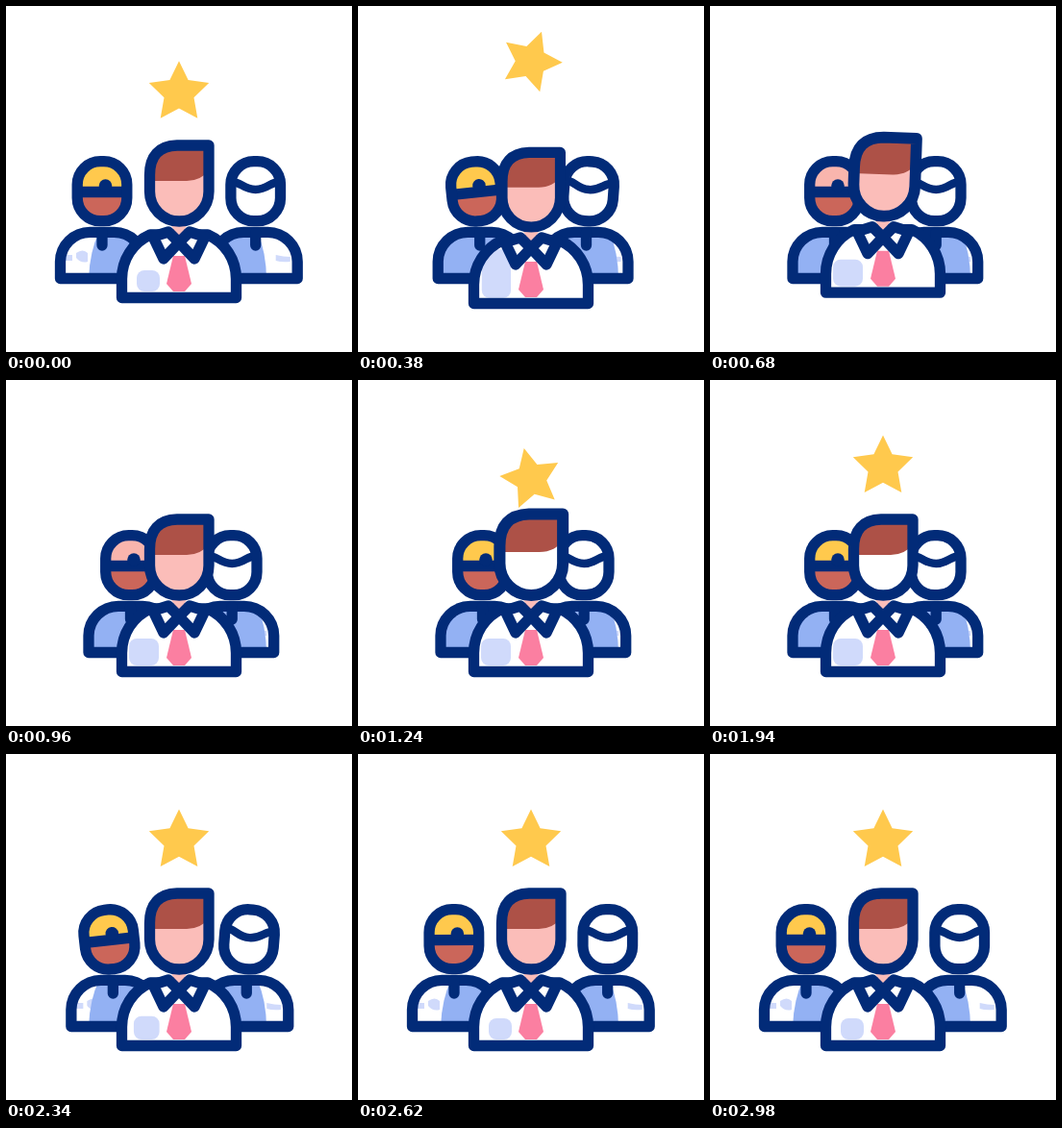
An HTML page that plays this animation: 360 px wide and 360 px high, repeating every 3 s.

```html
<!DOCTYPE html>
<html lang="en">
<head>
<meta charset="utf-8">
<title>Team leader</title>
<style>
html, body { margin: 0; width: 100%; height: 100%; overflow: hidden; background: #fff; }
svg { display: block; width: 100vw; height: 100vh; }
.line { fill: none; stroke: #022b78; stroke-width: 11.3; stroke-linejoin: round; stroke-linecap: round; }
.white { fill: #fff; }
.pale { fill: #d0dafb; }
.shade { fill: #93b1f3; }
</style>
</head>
<body>
<svg viewBox="0 0 360 360">
  <defs>
    <path id="sideBody" d="M-43.5 283.5V266A31 31 0 0 1 -12.5 235.3H12.5A31 31 0 0 1 43.5 266V283.5Z"/>
    <rect id="sideHead" x="-25.8" y="161.7" width="51.6" height="62" rx="24"/>
    <path id="shadow" d="M86 285Q87 250 101 228H258Q271 252 271 285Z"/>
    <path id="mainBody" d="M120.5 303.5V284C120.5 264 132 246 150 238H210C228 246 239.5 264 239.5 284V303.5Z"/>
    <path id="mainHead" d="M211 145H178Q149.5 146 149.5 176V193A30.75 31 0 0 0 211 193Z"/>
    <clipPath id="sideClip"><use href="#sideBody"/></clipPath>
    <clipPath id="bodyClip"><use href="#mainBody"/></clipPath>
    <clipPath id="headClip"><use href="#mainHead"/></clipPath>
  </defs>

  <path id="star" fill="#ffc94d"/>

  <g id="left">
    <use href="#sideBody" class="white"/>
    <g clip-path="url(#sideClip)">
      <path class="pale" d="M-27 257q7-5 12 0v9q-7 2-12-4zM-38 259h7v6h-7z"/>
      <use id="leftShade" href="#shadow" class="shade"/>
    </g>
    <use href="#sideBody" class="line"/>
    <path class="line" d="M0 236V249"/>
    <g id="leftHead">
      <use href="#sideHead" fill="#cb665a"/>
      <path id="cap" d="M-25.5 192V187A25.5 25.5 0 0 1 25.5 187V192Z"/>
      <path class="line" d="M-25 193.5H25"/>
      <circle cx="3.5" cy="187" r="6.8" fill="#022b78"/>
      <use href="#sideHead" class="line"/>
    </g>
  </g>

  <g id="right">
    <use href="#sideBody" class="white"/>
    <g clip-path="url(#sideClip)">
      <path class="pale" d="M21 259q8 2 15 2v5q-9 1-15-1z"/>
      <use id="rightShade" href="#shadow" class="shade"/>
    </g>
    <use href="#sideBody" class="line"/>
    <path class="line" d="M0 236V249"/>
    <g id="rightHead">
      <use href="#sideHead" class="white"/>
      <path class="line" style="stroke-width:8.5" d="M-26 183C-16 182-13 191 0 191S16 182 26 183"/>
      <use href="#sideHead" class="line"/>
    </g>
  </g>

  <g id="leader">
    <use href="#mainBody" class="white"/>
    <rect id="patch" class="pale" rx="8" clip-path="url(#bodyClip)"/>
    <path fill="#fb7fa1" d="M174 260H186L193 289 186 297H174L167 289Z"/>
    <use href="#mainBody" class="line"/>
    <path fill="#fbbdb9" d="M171 227H189L180 242Z"/>
    <path class="line" style="fill:#fff" d="M153 240L164 263 180 246 169 235ZM207 240L196 263 180 246 191 235Z"/>
    <g id="head">
      <use id="face" href="#mainHead"/>
      <path clip-path="url(#headClip)" fill="#ad5147" d="M145 140H216V160Q209 182 188 182H145Z"/>
      <use href="#mainHead" class="line"/>
    </g>
  </g>
</svg>
<script>
const LOOP = 3000;
const KICK = 580, CATCH = 1070;   // the star leaves the head, and comes back to it
const REST_Y = 90.4, TOUCH_Y = 107;

const set = (id, name, value) => document.getElementById(id).setAttribute(name, value);
const part = (t, a, b) => Math.min(1, Math.max(0, (t - a) / (b - a)));
const ease = (t, a, b) => { const u = part(t, a, b); return u * u * (3 - 2 * u); };
const pulse = (t, a, b) => Math.sin(Math.PI * part(t, a, b)) ** 2;

function starPath() {
  const corners = Array.from({ length: 10 }, (_, i) => {
    const r = i % 2 ? 16.3 : 32.8, a = i * Math.PI / 5;
    return `${(r * Math.sin(a)).toFixed(2)} ${(-r * Math.cos(a)).toFixed(2)}`;
  });
  return `M${corners.join("L")}Z`;
}

// A small toss, a high flight after the kick, then a soft return to rest.
function starHeight(t) {
  if (t < KICK) return 50 + (REST_Y - 50) * ((t - 265) / 265) ** 2;
  if (t < CATCH) {
    const u = part(t, KICK, CATCH);
    return TOUCH_Y - 900 * u * (1 - u);
  }
  return TOUCH_Y + (REST_Y - TOUCH_Y) * ease(t, CATCH, 1600);
}

// One fifth of a turn in all, so the star ends as it began.
const starTurn = t => 27 * ease(t, 0, KICK) + 28 * part(t, KICK, CATCH) + 17 * ease(t, CATCH, 1600);

function placeSide(side, x, tilt) {
  set(side, "transform", `translate(${x} 0)`);
  set(side + "Shade", "transform", `translate(${-x} 0)`);
  set(side + "Head", "transform", `rotate(${tilt} 0 228)`);
}

function draw(t) {
  const gather = ease(t, 0, 470) - ease(t, 1960, 2620);
  const tilt = -6.5 * (pulse(t, 0, 640) + pulse(t, 1960, 2660));
  placeSide("left", 100 + 29.5 * gather, tilt);
  placeSide("right", 259.7 - 24.5 * gather, -tilt * .7);

  const y = starHeight(t);
  set("star", "transform", `translate(180 ${y}) rotate(${starTurn(t)})`);
  set("cap", "fill", y < -32 ? "#f9b5ad" : "#ffc94d");

  const squat = pulse(t, 200, 660), hop = pulse(t, 590, 860), lift = pulse(t, 1100, 1400);
  const dip = pulse(t, 1040, 1180);
  set("leader", "transform", `translate(0 ${6.7 * squat - 7 * hop + dip})`);
  const size = 1 + .05 * hop + .07 * lift - .02 * (squat + dip);
  set("head", "transform", `translate(180 224) rotate(${2.6 * hop}) scale(${size}) translate(-180 -224)`);
  set("face", "fill", t > 1080 && t < 2160 ? "#fff" : "#fbbdb9");

  set("patch", "x", 136 - 8 * gather);
  set("patch", "y", 275 - 6 * gather - 25 * squat);
  set("patch", "width", 24 + 7 * gather);
  set("patch", "height", 22 + 6 * gather + 26 * squat);
}

set("star", "d", starPath());
const start = performance.now();
function frame() {
  draw((performance.now() - start) % LOOP);
  requestAnimationFrame(frame);
}
frame();
</script>
</body>
</html>
```
